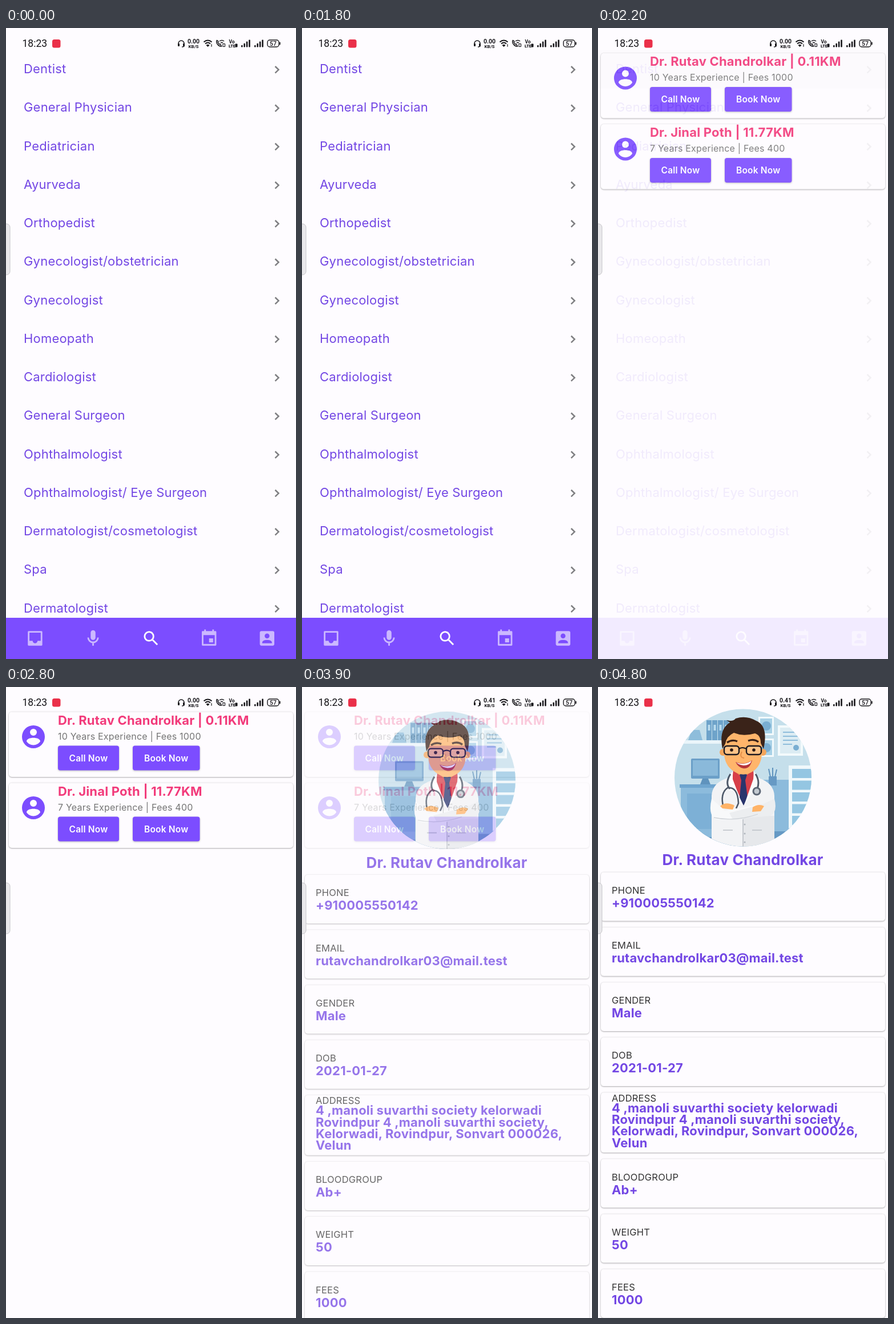
Recreate the animation shown at these times as an HTML page. Size 508 by 1102 pixels, loop 5 s.

```html
<!DOCTYPE html>
<html lang="en">
<head>
<meta charset="utf-8">
<title>Find a doctor</title>
<style>
  html, body { margin: 0; width: 100%; height: 100%; overflow: hidden; background: #fefcff; }
  svg { display: block; width: 100vw; height: 100vh; font-family: Inter, "Open Sans", sans-serif; }
  text { letter-spacing: .2px; white-space: pre; }
  .card { filter: drop-shadow(0 1.4px .8px #0004) drop-shadow(0 0 1px #0002); }
  .button { filter: drop-shadow(0 1.5px 1.5px #0004); }
  .line { fill: none; stroke: currentColor; stroke-width: 2; }
  .status { font-family: Roboto, sans-serif; }
  .status text { letter-spacing: 0; }
</style>
</head>
<body>
<svg id="stage" viewBox="0 0 508 1102" preserveAspectRatio="none"></svg>
<script type="module">
const PURPLE = '#7c4dff', TEXT_PURPLE = '#7347e4', PINK = '#f23b7b', PAPER = '#fefcff', INK = '#17161a';
const DOCTOR = 'Dr. Rutav Chandrolkar';
const LOOP = 5000, STEP = 100, OPEN_TIME = 300, SLIDE = 1102 / 4;
const RESULTS_START = 1917, PROFILE_START = 3650;

const text = (x, y, size, fill, str, weight = 400, anchor = 'start') =>
  `<text x="${x}" y="${y}" font-size="${size}" font-weight="${weight}" fill="${fill}" text-anchor="${anchor}">${str}</text>`;
const rect = (x, y, w, h, fill, rx = 0, extra = '') =>
  `<rect x="${x}" y="${y}" width="${w}" height="${h}" rx="${rx}" fill="${fill}" ${extra}/>`;
const circle = (x, y, r, fill) => `<circle cx="${x}" cy="${y}" r="${r}" fill="${fill}"/>`;
const path = (d, fill) => `<path d="${d}" fill="${fill}"/>`;
const stroke = (d, color, width) => `<path d="${d}" fill="none" stroke="${color}" stroke-width="${width}"/>`;
const card = (y, height) => rect(5, y, 498, height, PAPER, 5, 'class="card"');
const background = rect(0, 0, 508, 1102, PAPER);

// Specialty list
const specialties = ['Dentist', 'General Physician', 'Pediatrician', 'Ayurveda', 'Orthopedist',
  'Gynecologist/obstetrician', 'Gynecologist', 'Homeopath', 'Cardiologist', 'General Surgeon',
  'Ophthalmologist', 'Ophthalmologist/ Eye Surgeon', 'Dermatologist/cosmetologist', 'Spa', 'Dermatologist'];

const row = (name, i) => {
  const y = 79 + i * 67.25;
  return text(31, y, 22, TEXT_PURPLE, name) + stroke(`M471.5 ${y - 12}l6 5.8-6 5.8`, '#7f7f82', 2.5);
};

const navIcons = [
  `<path class="line" stroke-linejoin="round" d="M4 4h16v16H4z"/><path d="M4 15h5a3 3 0 0 0 6 0h5v5H4z"/>`,
  `<rect x="9" y="2" width="6" height="12" rx="3"/><path class="line" d="M5.9 11a6.1 6 0 0 0 12.2 0M12 17v4"/>`,
  `<circle class="line" cx="9.5" cy="9.5" r="5.5"/><path class="line" d="M14 14l5.8 5.8"/>`,
  `<path class="line" stroke-linejoin="round" d="M4 6V4h16v16H4zM7 1v3M17 1v3"/><path d="M4 4h16v4H4zM12 12h5v5h-5z"/>`,
  `<rect x="3" y="3" width="18" height="18" rx="2"/><g fill="${PURPLE}"><circle cx="12" cy="9" r="3"/><path d="M6 18v-1c0-4.1 12-4.1 12 0v1z"/></g>`
];
const navBar = rect(0, 1030, 508, 72, PURPLE) + navIcons.map((icon, i) => {
  const color = i === 2 ? '#fff' : '#cbb8ff';
  return `<g transform="translate(${34 + i * 101.6} 1049) scale(1.411)" fill="${color}" color="${color}">${icon}</g>`;
}).join('');

const listPage = background +
  `<clipPath id="firstRow"><path d="M0 38h508v68H0z"/></clipPath>
   <g clip-path="url(#firstRow)"><circle id="ripple" cx="400" cy="72" r="0" fill="#0000000c"/></g>` +
  specialties.map(row).join('') + navBar;

// Search results
const button = (x, w, label) => rect(x, 102.5, w, 43, PURPLE, 4, 'class="button"') +
  text(x + w / 2, 129.5, 15.5, '#fff', label, 600, 'middle');
const avatar = `<path transform="translate(24 63) scale(2)" fill="${PURPLE}" fill-rule="evenodd"
  d="M2 12a10 10 0 1 0 20 0a10 10 0 1 0-20 0zM9 8a3 3 0 1 1 6 0a3 3 0 1 1-6 0zM6 16c0-4.1 12-4.1 12 0c-3 4.3-9 4.3-12 0z"/>`;
const result = (i, title, details) => `<g transform="translate(0 ${i * 124})">` + card(43.5, 113.5) + avatar +
  text(91, 65.5, 22, PINK, title, 700) + text(91, 91.7, 16, '#757575', details) +
  button(91, 107, 'Call Now') + button(222, 117.5, 'Book Now') + '</g>';

const resultsPage = background +
  result(0, DOCTOR + ' | 0.11KM', '10 Years Experience | Fees 1000') +
  result(1, 'Dr. Jinal Poth | 11.77KM', '7 Years Experience | Fees 400');

// Doctor portrait
const office = rect(134, 38, 240, 242, '#c5dfeb') +
  rect(134, 246, 240, 40, '#6699c4') +
  rect(150, 93, 79, 6, '#eaf5fa') +
  [190, 200, 210, 220].map(x => rect(x, 58, 9, 35, '#6ea3ca') + rect(x + 2.5, 66, 4, 10, '#b9dbee')).join('') +
  path('M158 93l6-18h14l5 18z', '#8ebddb') +
  rect(163, 125, 50, 35, '#6b9fc8', 2) + rect(166, 128, 44, 27, '#8ab9da') +
  path('M183 160h10l4 10h-18z', '#5f93bd') +
  rect(145, 170, 85, 92, '#8cbbdc') + rect(143, 170, 92, 6, '#6fa5cf') + rect(156, 186, 44, 62, '#7db0d6') +
  rect(290, 162, 46, 90, '#8cbbdc') + rect(299, 156, 14, 16, '#6699c4') +
  stroke('M302 157l-3-14M306 156v-15M310 157l3-13', '#5f93bd', 2) +
  [52, 90].map(y => rect(281, y, 27, 32, '#f3fafc') + rect(284, y + 3, 21, 26, '#a9d2e7') +
    circle(295, y + 16, 8, '#79aed2')).join('') +
  rect(315, 67, 44, 53, '#f3fafc') + rect(319, 71, 36, 45, '#dcecf3') +
  stroke('M324 79h26M324 86h26M324 93h26M324 100h16', '#8ebddb', 2) + circle(347, 106, 5, '#79aed2') +
  rect(334, 137, 42, 110, '#f0f8fb') +
  [0, 1, 2, 3, 4].map(i => rect(340, 143 + i * 20.5, 38, 16, '#94c6e2')).join('');

const coat = path('M199 280V190Q200 168 226 159L254 148L282 159Q308 168 309 190V280z', '#f2f3f5') +
  path('M254 225H309V280H254z', '#e6e8eb') +
  path('M238 130h32v24l-16 12-16-12z', '#ee9c55') +
  path('M237 146l17 12 18-12 2 16-19 44-20-44z', '#d73f49') +
  path('M248 153l6-3 7 3-3 10 4 30-7 14-7-14 3-30z', '#29356d') +
  path('M236 147l-10 13 3 20 8 1 17 28-18-48z', '#fff') +
  path('M273 147l10 13-3 20-8 1-17 28 17-48z', '#fafbfc') +
  stroke('M232 152Q222 168 231 178M276 152Q284 164 279 178', '#4d5868', 3) +
  stroke('M220 211Q213 186 227 176Q245 174 246 203L242 212', '#4d5868', 2.6) +
  circle(278, 182, 7.5, '#5c6675') + circle(278, 182, 4.5, '#c3cad1') +
  path('M199 195Q193 221 204 230Q216 237 280 223L278 206L222 216z', '#f8f9fa') +
  path('M309 195Q315 218 302 225L236 231L230 220L290 204z', '#eceef0') +
  path('M214 208Q224 199 239 207L236 214L218 212z', '#ffb367') +
  path('M271 210Q281 203 291 208L285 217L270 218z', '#ffb367') +
  stroke('M203 228Q240 236 280 222', '#cfd3d8', 1.3) +
  stroke('M219 250h17M270 250h17M254 231v49', '#bcc1c7', 1.6) +
  [240, 256, 271].map(y => circle(257, y, 1.5, '#aeb4bb')).join('');

const lens = x => rect(x, 103, 26, 15, '#ffffff30', 5, 'stroke="#1c1a20" stroke-width="2.4"') +
  circle(x + 13, 110, 2.8, '#2a1a14');
const head = circle(219, 114, 6, '#f3a55c') + circle(289, 114, 6, '#f3a55c') +
  path('M221 86Q254 58 287 86V118Q285 143 264 151Q253 155 243 150Q223 141 221 118z', '#ffb56b') +
  path('M218 108Q211 74 231 62L225 58Q237 61 241 55Q260 49 277 59Q299 68 290 108L285 98Q285 84 275 81Q255 87 238 80Q225 86 223 99z', '#3a2319') +
  stroke('M226 97q9-6 18-2M263 94q10-4 18 2', '#3a2319', 3.4) +
  lens(221) + lens(260) + stroke('M247 108q6-4 13 0', '#1c1a20', 2.2) +
  stroke('M252 113q-5 10 4 11', '#e58f48', 2) +
  path('M241 131Q256 137 270 128Q266 144 254 142Q245 140 241 131z', '#b7353b') +
  path('M242 132Q256 137 269 129Q266 137 255 137Q247 136 242 132z', '#fff');

const portrait = `<clipPath id="round"><circle cx="254" cy="158.5" r="120"/></clipPath>
  <g clip-path="url(#round)">${office}${coat}${head}</g>`;

// Doctor profile
const fields = [
  ['PHONE', '+910005550142'],
  ['EMAIL', 'rutavchandrolkar03@mail.test'],
  ['GENDER', 'Male'],
  ['DOB', '2021-01-27'],
  ['ADDRESS', '4 ,manoli suvarthi society kelorwadi', 'Rovindpur 4 ,manoli suvarthi society,',
    'Kelorwadi, Rovindpur, Sonvart 000026,', 'Velun'],
  ['BLOODGROUP', 'Ab+'],
  ['WEIGHT', '50'],
  ['FEES', '1000']
];
let cardTop = 323.5;
const fieldCards = fields.map(([label, ...lines]) => {
  const isLong = lines.length > 1;
  const height = isLong ? 104.8 : 85;
  const base = cardTop + (isLong ? 15.5 : 37.3);
  const markup = card(cardTop, height) + text(24, base, 16.5, '#333', label) +
    lines.map((line, i) => text(24, base + (isLong ? 18.8 : 24) + i * 20.4, 22, TEXT_PURPLE, line, 700)).join('');
  cardTop += height + 11.2;
  return markup;
}).join('');

const profilePage = background + portrait +
  text(253.5, 311, 26, TEXT_PURPLE, DOCTOR, 700, 'middle') + fieldCards;

// Status bar and edge handle
const signal = x => [0, 1, 2, 3].map(i => rect(x + i * 4.4, 30 - i * 3.2, 2.6, 3.4 + i * 3.2, INK, 1)).join('');
const statusBar = '<g class="status">' +
  text(28.5, 33, 17.5, INK, '18:23') + rect(81, 20, 14.5, 14.5, '#ea3049', 3.5) +
  stroke('M302 28v-1a5 5 0 0 1 10 0v4q0 2-4 2', INK, 1.5) +
  rect(301, 27, 3, 5, INK, 1) + rect(310, 27, 3, 5, INK, 1) +
  `<text id="speed" x="328.5" y="26.5" font-size="10.5" font-weight="600" text-anchor="middle" fill="${INK}"></text>` +
  text(328.5, 34.5, 8, INK, 'KB/S', 700, 'middle') +
  stroke('M346.5 24.5q7-6 14 0M349 27.5q4.5-4 9 0', INK, 1.9) + path('M350.5 30q3-2.5 6 0l-3 3z', INK) +
  rect(359, 28, 2, 5, '#777', 1) +
  stroke('M369.5 21.5q-2 3 1 7t7 3.5l-2-4-2 .5-2.5-3.5 1-1.5zM374 23q4-3 8 0M376 26q2-1.5 4 0', INK, 1.5) +
  rect(380, 27.5, 3.5, 5, 'none', .5, `stroke="${INK}" stroke-width="1.2"`) +
  text(390.5, 26.5, 8.5, INK, 'Vo', 700) + text(390, 33.5, 7.2, INK, 'LTE', 800) +
  rect(401.5, 27.5, 4, 6, INK, 1) + signal(412) + signal(435) +
  rect(458, 21, 20, 12, 'none', 4, `stroke="${INK}" stroke-width="1.4"`) + rect(479, 24.5, 1.6, 5, INK, .8) +
  text(468, 30.8, 10.5, INK, '57', 500, 'middle') + '</g>';
const handle = rect(-8, 342, 15, 89, '#e9e8eb', 6, 'stroke="#c6c5c9"');

document.getElementById('stage').innerHTML =
  `<g>${listPage}</g><g id="results">${resultsPage}</g><g id="profile">${profilePage}</g>${statusBar}${handle}`;

const [ripple, results, profile, speed] =
  ['ripple', 'results', 'profile', 'speed'].map(id => document.getElementById(id));

// Cubic Bézier easing, solved by bisection
const bezier = (x1, y1, x2, y2) => x => {
  const at = (a, b, s) => 3 * a * s * (1 - s) ** 2 + 3 * b * s * s * (1 - s) + s ** 3;
  let low = 0, high = 1;
  for (let i = 0; i < 24; i++) {
    const mid = (low + high) / 2;
    if (at(x1, x2, mid) < x) low = mid; else high = mid;
  }
  return at(y1, y2, low);
};
const slideEase = bezier(.4, 0, .2, 1), fadeEase = bezier(.42, 0, 1, 1);

// A page fades in while rising by a quarter of the screen
function openPage(page, elapsed) {
  const p = Math.min(1, Math.max(0, elapsed / OPEN_TIME));
  page.setAttribute('visibility', p > 0 ? 'visible' : 'hidden');
  page.setAttribute('opacity', p < 1 ? fadeEase(p) : 1);
  page.setAttribute('transform', `translate(0 ${p < 1 ? SLIDE * (1 - slideEase(p)) : 0})`);
}

function draw(now) {
  const t = Math.floor(now / STEP) * STEP % LOOP;
  ripple.setAttribute('r', Math.max(0, t - 1900) * 1.34);
  openPage(results, t - RESULTS_START);
  openPage(profile, t - PROFILE_START);
  speed.textContent = t < 3200 ? '0.00' : '0.41';
  requestAnimationFrame(draw);
}
draw(performance.now());
</script>
</body>
</html>
```
